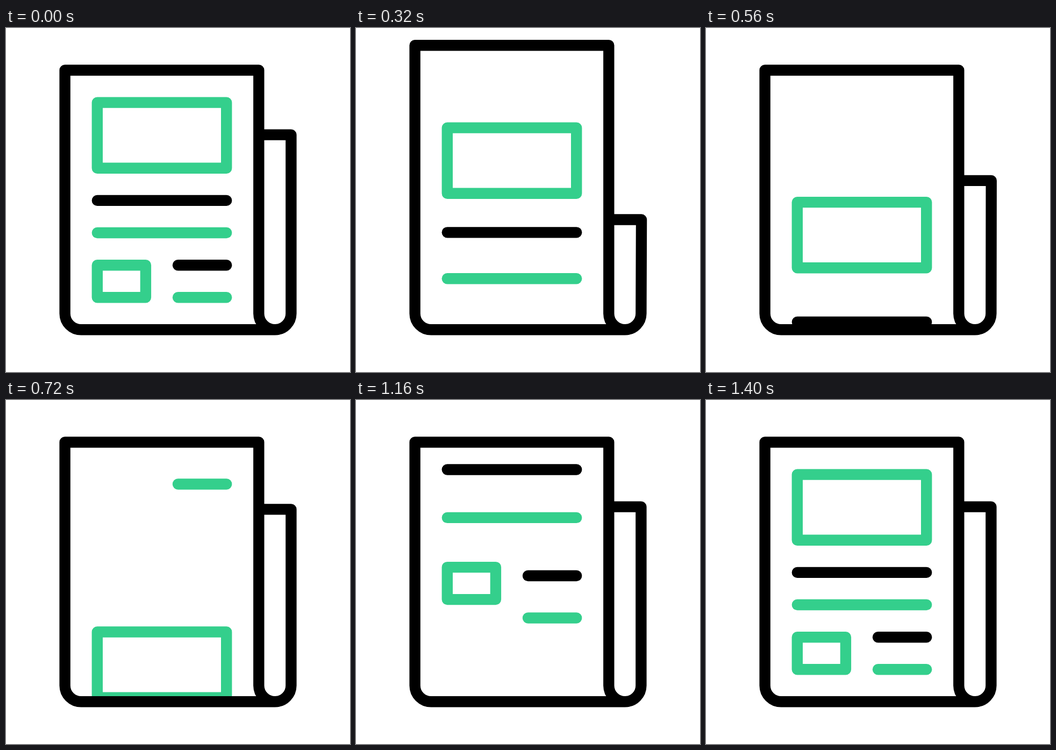
These frames come from a looping animation (640 px wide and 640 px high, 2000 ms). An HTML page:

```html
<!DOCTYPE html>
<html lang="en">
<head>
<meta charset="utf-8">
<title>Newspaper</title>
<style>
  html, body { margin: 0; width: 100%; height: 100%; overflow: hidden; background: #fff; }
  svg { display: block; width: 100vw; height: 100vh; }
  path { fill: none; stroke-width: 20.4; stroke-linecap: round; stroke-linejoin: round; }
</style>
</head>
<body>
<svg viewBox="0 0 640 640">
  <defs><clipPath id="inside"><rect id="window" x="110" width="360"/></clipPath></defs>
  <g id="content" clip-path="url(#inside)"></g>
  <path id="page" stroke="#000"/>
</svg>
<script>
const LOOP = 2000, STEP = 40, BEGIN = 120, PEAK = 360, END = 1400;
const DROP = 452, RISE = 462;
const GREEN = '#34cf8c', BLACK = '#000';
const byId = id => document.getElementById(id);

const line = (x, y) => `M${x} ${y}H410.2`;
const box = (x2, y1, y2) => `M169.8 ${y1}H${x2}V${y2}H169.8Z`;

// out: how long the item takes to leave; back: when it starts to return
const items = [
  { d: box(410.2, 138.6, 260.8), color: GREEN, out: 1000, back: 960 },
  { d: line(169.8, 320.9), color: BLACK, out: 880, back: 840 },
  { d: line(169.8, 381), color: GREEN, out: 720, back: 760 },
  { d: box(259.9, 441.2, 501.2), color: GREEN, out: 560, back: 640 },
  { d: line(320, 441.2), color: BLACK, out: 480, back: 560 },
  { d: line(320, 501.2), color: GREEN, out: 400, back: 440 }
];

function addPath(item) {
  const el = document.createElementNS('http://www.w3.org/2000/svg', 'path');
  el.setAttribute('d', item.d);
  el.setAttribute('stroke', item.color);
  byId('content').append(el);
  return el;
}
for (const item of items) {
  item.leaving = addPath(item);
  item.coming = addPath(item);
}

const progress = (t, from, to) => Math.min(1, Math.max(0, (t - from) / (to - from)));
const smooth = p => p * p * (3 - 2 * p);

// cubic-bezier(.167, 0, .833, 1)
function glide(p) {
  let lo = 0, hi = 1;
  for (let i = 0; i < 24; i++) {
    const s = (lo + hi) / 2;
    if (s * (0.5 + s * (1.5 - s)) < p) lo = s; else hi = s;
  }
  return smooth((lo + hi) / 2);
}

// Rises to 1 at the peak, then falls back to 0
const bump = (t, end) => smooth(progress(t, BEGIN, PEAK)) - smooth(progress(t, PEAK, end));

function place(el, y, visible) {
  el.setAttribute('transform', `translate(0 ${y.toFixed(2)})`);
  el.setAttribute('visibility', visible ? 'visible' : 'hidden');
}

function draw(t) {
  const top = 78.5 - 50 * bump(t, 560);
  const fold = bump(t, 760);
  const foldY = 198.6 + 170.6 * fold;
  const foldX = 530.4 + 0.7 * fold;

  byId('page').setAttribute('d',
    `M500.4 561.3H139.7A30.1 30.1 0 0 1 109.6 531.2V${top}H470.3V531.2` +
    `A30.1 30.1 0 0 0 500.4 561.3A30.1 30.1 0 0 0 530.4 531.2L${foldX} ${foldY}H470.3`);
  byId('window').setAttribute('y', top);
  byId('window').setAttribute('height', 556 - top);

  for (const { leaving, coming, out, back } of items) {
    place(leaving, DROP * smooth(progress(t, BEGIN, BEGIN + out)), t < BEGIN + out);
    place(coming, -RISE * (1 - glide(progress(t, back, END))), t >= back);
  }
}

const start = performance.now();
function tick() {
  const t = (performance.now() - start) % LOOP;
  draw(Math.floor((t + 1) / STEP) * STEP % LOOP);
  requestAnimationFrame(tick);
}
tick();
</script>
</body>
</html>
```
